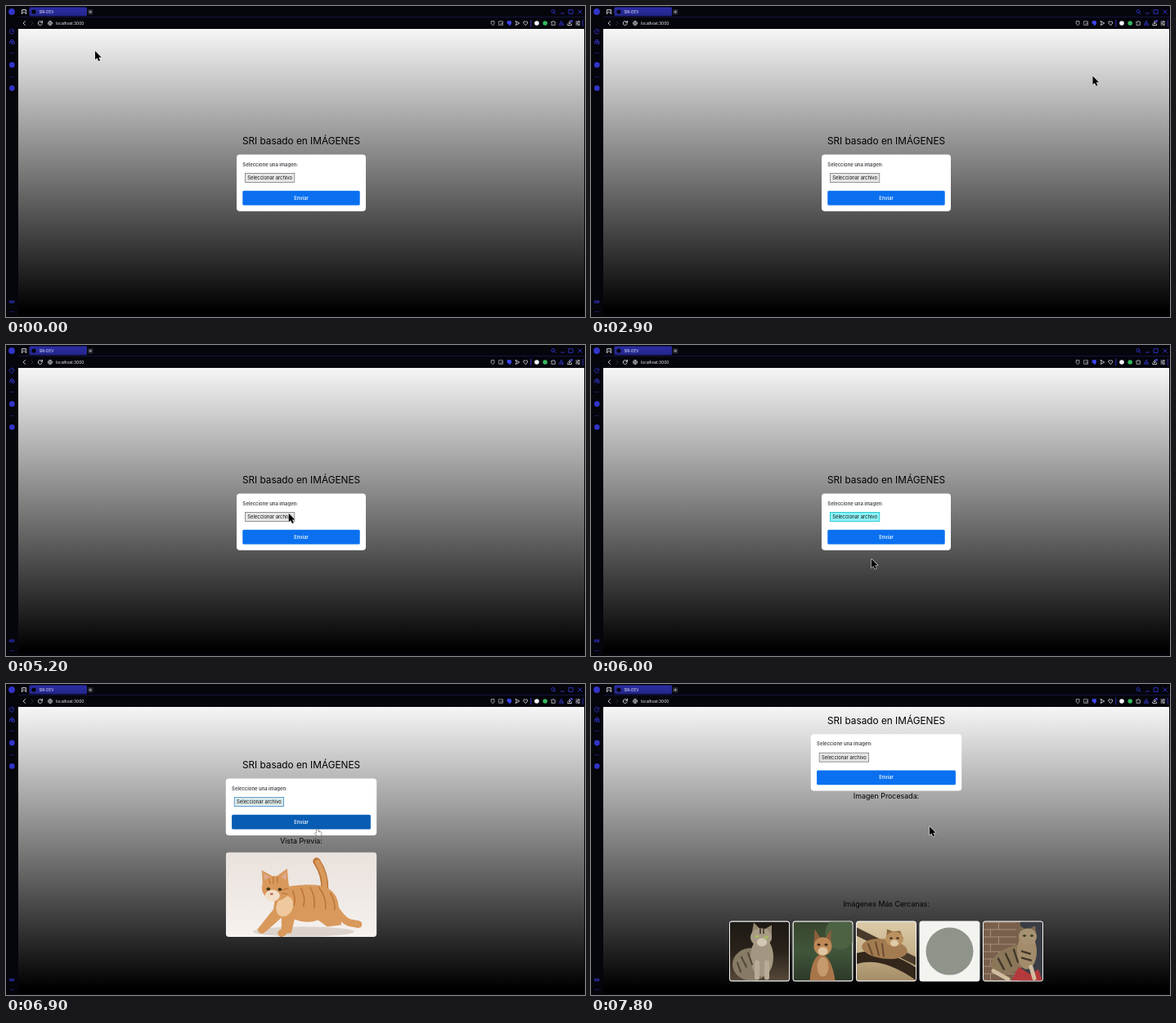
These frames come from a looping animation (708x380 px, 8000 ms). An HTML page with a canvas:

```html
<!DOCTYPE html>
<html lang="es">
<head>
<meta charset="utf-8">
<title>SRI-DEV</title>
<style>
html, body { margin: 0; width: 100%; height: 100%; overflow: hidden; background: #05050c; }
canvas { display: block; width: 708px; height: 380px; }
</style>
</head>
<body>
<canvas id="stage" width="708" height="380"></canvas>
<script>
const c = document.getElementById('stage').getContext('2d');
const LOOP = 8000, STEP = 100, MID = 361;
const BLUE = '#3234c8', WHITE = '#e4e4ee';

// Pointer stops: time, x, y
const stops = [
  [0, 109, 55], [300, 359, 225], [400, 213, 108], [600, 213, 108], [1000, 396, 110],
  [2800, 396, 110], [2900, 613.5, 85.5], [3100, 613, 84], [3300, 613, 84], [3400, 639, 84],
  [3700, 639, 84], [3900, 599, 115], [4300, 599, 115], [4400, 510, 152], [4600, 510, 152],
  [4700, 491, 162], [4800, 491, 162], [5600, 325, 212, 1], [5800, 325, 212], [5900, 343, 261.5],
  [6200, 343, 261.5], [7300, 383, 173, 1], [7600, 387, 177.3], [7700, 387, 177.3], [7800, 414, 174]
];

const clamp = v => Math.max(0, Math.min(1, v));
const mix = (a, b, k) => a + (b - a) * k;
const blend = (a, b, k) => `rgb(${a.map((v, i) => Math.round(mix(v, b[i], k)))})`;

function pointerAt(t) {
  const i = stops.findIndex(s => s[0] > t);
  if (i < 0) return stops[stops.length - 1].slice(1, 3);
  const [t0, x0, y0] = stops[i - 1], [t1, x1, y1, ease] = stops[i];
  let k = (t - t0) / (t1 - t0);
  if (ease) k = 1 - (1 - k) ** 3;
  return [mix(x0, x1, k), mix(y0, y1, k)];
}

function rect(x, y, w, h, fill, r = 0) {
  c.fillStyle = fill;
  c.beginPath();
  c.roundRect(x, y, w, h, r);
  c.fill();
}
function disc(x, y, r, fill) {
  oval(x, y, r, r, fill);
}
function oval(x, y, rx, ry, fill, turn = 0) {
  c.fillStyle = fill;
  c.beginPath();
  c.ellipse(x, y, rx, ry, turn, 0, 7);
  c.fill();
}
function poly(d, fill, x = 0, y = 0) {
  c.save();
  c.translate(x, y);
  c.fillStyle = fill;
  c.fill(new Path2D(d));
  c.restore();
}
function line(d, color, width = 0.8, x = 0, y = 0) {
  c.save();
  c.translate(x, y);
  c.strokeStyle = color;
  c.lineWidth = width;
  c.lineCap = c.lineJoin = 'round';
  c.stroke(new Path2D(d));
  c.restore();
}
function text(s, x, y, size, color, align = 'left', weight = 400) {
  c.font = `${weight} ${size}px Inter, sans-serif`;
  c.textAlign = align;
  c.fillStyle = color;
  c.fillText(s, x, y);
}
function fade(y0, y1, ...colors) {
  const g = c.createLinearGradient(0, y0, 0, y1);
  colors.forEach((v, i) => g.addColorStop(i / (colors.length - 1), v));
  return g;
}
function clipped(x, y, w, h, r, draw) {
  c.save();
  c.beginPath();
  c.roundRect(x, y, w, h, r);
  c.clip();
  c.translate(x, y);
  draw();
  c.restore();
}

function drawBrowser() {
  rect(0, 0, 708, 380, '#05050c');
  rect(15, 13, 693, 0.8, '#17184e');
  rect(28.5, 1.5, 70.5, 10.8, fade(1, 12, '#2c2ea6', '#23258a'), 1.5);
  disc(7, 7, 3.9, BLUE);
  line('M-2.5 2.5V-2.5H2.5V2.5M-2.5 2.5L-.8 .8H.8L2.5 2.5M-1-1V-.8M1-1V-.8', WHITE, 0.8, 22, 7);
  disc(34, 7, 2.6, '#050507');
  text('SRI-DEV', 40.5, 8.6, 4.43, '#f0f0ff');
  rect(100, 4, 6.5, 6.5, '#25252f', 1);
  line('M-1.5 0H1.5M0-1.5V1.5', '#c8c8d4', 0.7, 103.2, 7.2);

  line('M2 0A2 2 0 1 1-2 0A2 2 0 1 1 2 0M1.4 1.4L3 3', BLUE, 0.9, 669, 6.5);
  line('M-2 2H2', BLUE, 0.9, 680.5, 7);
  line('M-2.4-2.4H2.4V2.4H-2.4Z', BLUE, 0.9, 690.8, 7);
  line('M-2.3-2.3L2.3 2.3M2.3-2.3L-2.3 2.3', BLUE, 0.9, 702, 7);

  line('M1.2-2.4L-1.2 0L1.2 2.4', WHITE, 0.9, 22.3, 21);
  line('M-1.2-2.4L1.2 0L-1.2 2.4', '#34343f', 0.9, 32, 21);
  line('M2.3-1A2.5 2.5 0 1 0 2.4 .8M2.6-2.8V-.9H.8', WHITE, 0.9, 41.8, 21);
  line('M2.6 0A2.6 2.6 0 1 1-2.6 0A2.6 2.6 0 1 1 2.6 0M-2.6 0H2.6M0-2.6Q-2.4 0 0 2.6Q2.4 0 0-2.6', '#c9c9d2', 0.7, 54, 21);
  text('localhost:3000', 61, 22.8, 4.85, '#f2f2f8');

  line('M-1.7-2.4H1.7V1.2L0 2.7L-1.7 1.2Z', '#b9b9c4', 0.8, 595.3, 21);
  line('M-2.3-2.3H2.3V2.3H-2.3ZM-.5 1H1V-.5', '#a5a5b2', 0.8, 605.3, 21);
  poly('M-2.7-2.2L0-3L2.7-2.2V.5Q2 2.5 0 3Q-2-2.5-2.7 .5Z', '#3d45f0', 615.3, 21);
  rect(613, 18.6, 4.6, 3.6, '#3d45f0', 1);
  line('M-2-2.5L2.5 0L-2 2.5L-1.2 0Z', WHITE, 0.8, 625.3, 21);
  line('M0 2.4L-2.5-.2Q-2.8-2.4-1-2.3L0-1.4L1-2.3Q2.8-2.4 2.5-.2Z', WHITE, 0.8, 635.2, 21);
  rect(641.3, 16.8, 1, 8.4, BLUE);
  disc(649, 21, 2.8, '#f4f4f8');
  disc(659.2, 21, 2.8, '#35b95c');
  line('M-2.2-1.5H-.8Q-.6-3 .6-2.6L.8-1.5H2.2V2.3H-2.2V1Q-.6 .4-2.2-.3Z', '#c4c4d0', 0.8, 669.2, 21);
  line('M0-2.5L2.5 2.2H-2.5ZM-1 .6H1', BLUE, 0.9, 679.2, 21);
  line('M0-2.6V.8M-1.5-.6L0 .9L1.5-.6M-2.4 1V2.5H2.4V1', WHITE, 0.8, 689.2, 21);
  disc(691.6, 18.4, 1.3, '#4a4df0');
  line('M-2.4-2H2.4M-2.4 0H2.4M-2.4 2H2.4M1-2.6V-1.4M-1-.6V.6M1 1.4V2.6', WHITE, 0.7, 699.3, 21);
  rect(704.8, 16.8, 0.9, 8.4, BLUE);

  line('M2.6 1.8A3 3 0 1 1 2.8-1M0 0L2.6-.4', BLUE, 0.9, 7.2, 31);
  line('M-2.8 2.4V0H-.5V2.4M.5 2.4V0H2.8V2.4ZM-1.4 0V-2H1.4V0', BLUE, 0.9, 7.3, 43.5);
  disc(7.3, 72, 3.4, BLUE);
  disc(7.3, 100.4, 3.3, BLUE);
  line('M-2.5-1.2H2.5V1.2H-2.5ZM-1 0H-.9M1 0H1.1', BLUE, 0.9, 7.2, 361.5);
  for (const y of [57.5, 86.5, 373.5])
    for (const dx of [-1.8, 0, 1.8]) disc(7.2 + dx, y, 0.5, BLUE);

  rect(15, 28, 692, 350, fade(28, 372, '#f6f6f6', '#000'));
}

function drawForm(left, top, fileHover, focus, sendHover) {
  const w = (MID - left) * 2;
  text('SRI basado en IMÁGENES', MID, top - 12.2, 11.8, '#000', 'center');
  rect(left, top, w, 69.3, '#fff', 4);
  text('Seleccione una imagen:', left + 7.3, top + 14.2, 5.9, '#44474d', 'left', 600);
  rect(left + 10, top + 22.6, 61.2, 11.6, focus ? '#2f7fc4' : blend([116, 116, 116], [0, 190, 200], fileHover));
  rect(left + 10.7, top + 23.3, 59.8, 10.2, blend([230, 230, 230], [140, 242, 248], fileHover));
  text('Seleccionar archivo', left + 13.2, top + 30.7, 5.9, '#111');
  rect(left + 7.3, top + 44.2, w - 14.6, 17.8, sendHover ? '#075cb3' : '#0a70f0', 1.5);
  text('Enviar', MID, top + 55.2, 5.9, '#fff', 'center', 500);
}

function drawCat() {
  const fur = '#d9995c', dark = '#bd7537', pale = '#efc99d';
  rect(0, 0, 185, 104, fade(0, 104, '#e9e1dc', '#efe9e5', '#f6f2ef'));
  oval(95, 97, 62, 6, '#dcd3cd');
  line('M121 47Q122 27 111 11', dark, 9);
  line('M121 47Q122 27 112 12', fur, 6);
  poly('M62 46Q88 37 118 41Q139 48 138 72Q142 81 141 89L124 91L113 83Q98 88 84 82L80 99L68 99L68 80L50 96L38 95L58 70Z', fur);
  line('M131 64Q141 82 151 86L162 88', fur, 9);
  line('M64 76Q50 90 44 95', fur, 9);
  line('M77 80Q76 95 68 99', fur, 9);
  line('M92 44Q98 56 95 66M103 43Q110 54 108 68M114 43Q123 55 122 69M128 50Q134 60 133 70M82 47Q86 57 83 65', dark, 1.6);
  oval(72, 66, 10, 13, pale, 0.4);
  poly('M45 40L44 22L60 31L75 20L77 42Z', fur);
  poly('M48 36L46.5 26L56 32ZM66 33L73.5 24L74 38Z', '#e0a995');
  oval(61, 44, 17, 15, fur, 0.15);
  oval(57, 53, 9, 7, '#f3dfc8');
  line('M58 30V38M63 30V37M53 33L54 38M69 46L76 44M69 50L75 51', dark, 1.3);
  oval(52, 45, 2.4, 2, '#4b3a1c');
  oval(66, 45.5, 2.4, 2, '#4b3a1c');
  oval(56, 51, 2, 1.4, '#bd6a58');
}

const photos = [
  () => {
    rect(0, 0, 72, 72, fade(0, 72, '#1d1914', '#29221a', '#56483a'));
    oval(26, 52, 23, 20, '#887b66');
    oval(39, 43, 14, 24, '#a49781');
    poly('M26 18L29 1L39 11L51 4L51 22Z', '#94866f');
    oval(38, 19, 13, 11, '#a99c86');
    oval(39, 25, 6, 5, '#d2c7b4');
    oval(33, 18, 2.4, 1.8, '#a9bd60');
    oval(44, 19, 2.4, 1.8, '#a9bd60');
    line('M14 43L20 55M22 38L27 52M9 50L13 61M37 9V14M41 9V14', '#4f4639', 2);
    line('M33 50V68M45 50V68', '#b9ac96', 6);
  },
  () => {
    rect(0, 0, 72, 72, fade(0, 72, '#37462d', '#40563a', '#2c3828'));
    oval(57, 14, 18, 20, '#4c6242');
    poly('M20 72Q22 43 34 39Q47 43 51 72Z', '#a87549');
    poly('M25 28L26 9L34 21L38 21L46 9L46 29Z', '#8d5f3d');
    oval(36, 30, 11, 11, '#bd8955');
    oval(36, 36, 6, 5, '#dfc5a2');
    oval(31, 28, 2, 1.4, '#302514');
    oval(40, 28, 2, 1.4, '#302514');
    oval(36, 55, 7, 12, '#c69b6c');
  },
  () => {
    rect(0, 0, 72, 72, fade(0, 72, '#dccba9', '#c6b28b', '#a38c66'));
    line('M-4 10L76 50', '#49392a', 9);
    line('M-4 46Q30 34 76 66', '#33271c', 13);
    oval(34, 33, 28, 12, '#a37b50', 0.12);
    line('M14 27L19 40M23 25L27 41M31 27L33 42', '#6a4c30', 2);
    poly('M36 19L37 9L44 12L53 11L57 21Z', '#8d683f');
    oval(46, 21, 11, 9, '#ba915f');
    oval(46, 26, 5, 4, '#e0cba9');
    oval(42, 20, 1.8, 1.2, '#33291c');
    oval(50, 20, 1.8, 1.2, '#33291c');
  },
  () => {
    rect(0, 0, 72, 72, '#f3f3f0');
    disc(36, 36, 29, '#8f948b');
  },
  () => {
    rect(0, 0, 72, 72, '#79604d');
    for (let y = 0; y < 72; y += 9) {
      rect(0, y, 40, 1, '#a3917d');
      rect(y % 2 ? 8 : 18, y, 1, 9, '#a3917d');
    }
    rect(45, 0, 27, 72, '#3b3d45');
    oval(34, 46, 27, 15, '#8b7659', -0.45);
    oval(53, 36, 12, 22, '#a28c6b');
    line('M18 45L25 58M27 39L34 54M37 34L42 49M47 36L57 39M47 44L58 47', '#42382b', 2.4);
    poly('M43 20L44 5L53 10L63 5L65 20Z', '#7d6a4f');
    oval(54, 18, 11, 10, '#a69273');
    oval(50, 17, 1.9, 1.4, '#303a20');
    oval(59, 17, 1.9, 1.4, '#303a20');
    poly('M34 72L43 55L57 64L67 58L72 72Z', '#b4393c');
    line('M12 60L30 70M58 55L62 69', '#d2bda0', 5);
  }
];

function drawResults() {
  text('Imagen Procesada:', MID, 140, 8.86, '#000', 'center');
  text('Imágenes Más Cercanas:', MID, 271.5, 8.86, '#000', 'center');
  photos.forEach((draw, i) => {
    const x = 169 + i * 77.5;
    rect(x, 289.6, 74, 74, '#f4f4f4', 3.5);
    clipped(x + 1, 290.6, 72, 72, 2.5, draw);
  });
}

function drawPointer(x, y, hand) {
  const shape = hand
    ? 'M-1 .6Q0-.6 1 .6V3.2L4.2 4Q5 4.3 4.7 5.5L4 8.3H-.6L-3 5.2Q-3 4-1 5Z'
    : 'M0 0V10.6L2.4 8.4L4.2 12.2L6 11.4L4.3 7.7H7.6Z';
  line(shape, hand ? '#222' : '#e6e6e6', hand ? 0.9 : 1.1, x, y);
  poly(shape, hand ? '#fff' : '#000', x, y);
}

function draw(t) {
  const [x, y] = pointerAt(t);
  const preview = t >= 6100 && t < 7800, done = t >= 7800;
  const left = preview || done ? 268.8 : 282;
  const top = done ? 61.2 : preview ? 115.6 : 181.5;
  const onSend = preview && x > 276 && x < 446 && y > 159.8 && y < 177.6;
  const fileHover = clamp((t - 5200) / 400) * clamp((7000 - t) / 700);

  drawBrowser();
  drawForm(left, top, fileHover, t >= 6900 && !done, onSend);
  if (preview) {
    text('Vista Previa:', MID, 194.5, 8.86, '#000', 'center');
    clipped(268.8, 205.6, 184.4, 103.4, 4, drawCat);
  }
  if (done) drawResults();
  drawPointer(x, y, onSend);
}

const start = performance.now();
function tick() {
  const t = (performance.now() - start) % LOOP;
  draw(Math.floor(t / STEP) * STEP);
  requestAnimationFrame(tick);
}
tick();
</script>
</body>
</html>
```
